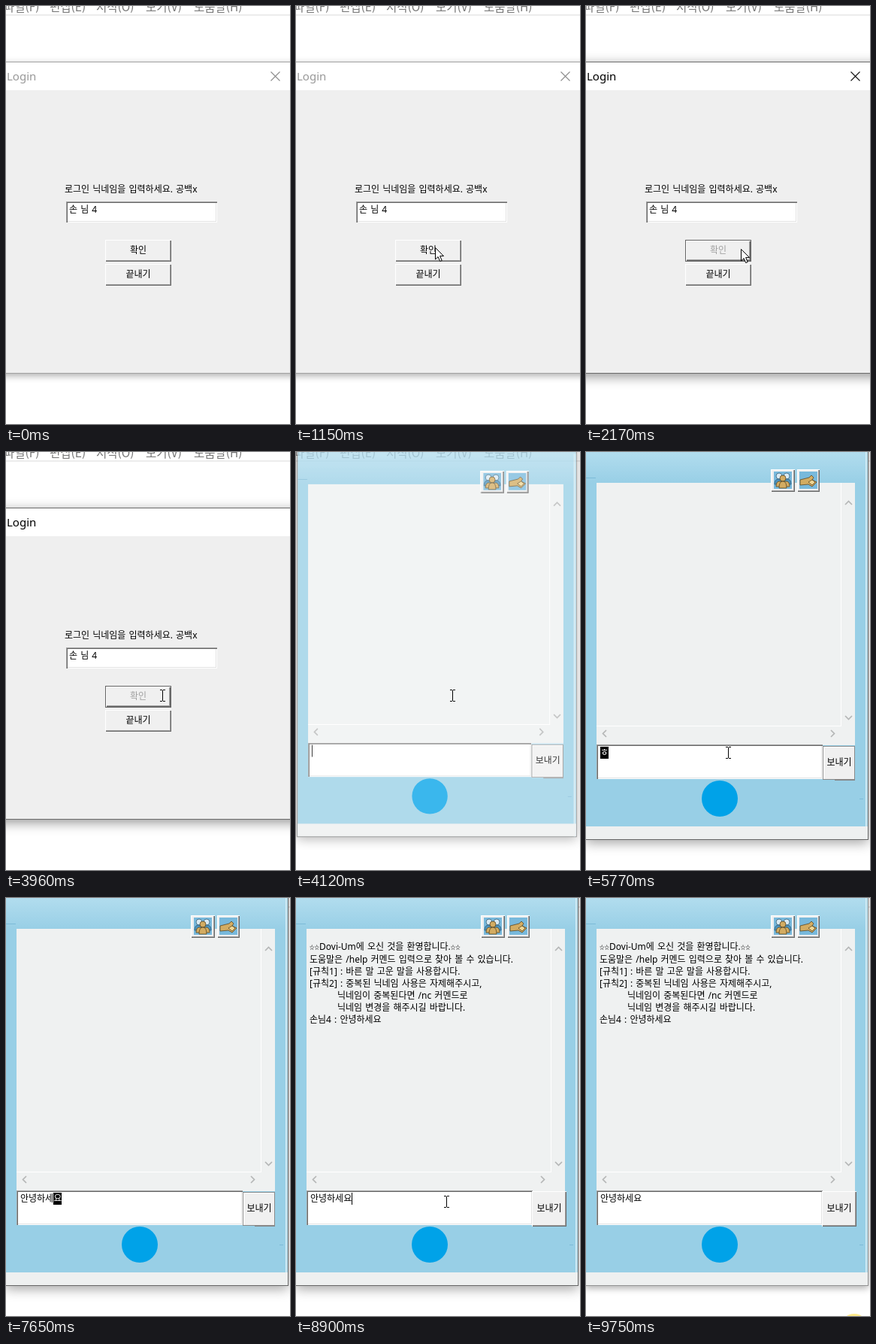
Animation of 378x556 px, one loop 9840 ms. Source, as an HTML page:

```html
<!DOCTYPE html>
<html lang="ko">
<head>
<meta charset="utf-8">
<title>Chat login</title>
<style>
html, body { margin: 0; width: 100%; height: 100%; overflow: hidden; background: #fff; }
#stage { position: relative; width: 378px; height: 556px; overflow: hidden; background: #fff;
  font: 12px/16px "Noto Sans", "Noto Sans CJK KR", sans-serif; word-spacing: 1px; color: #000; }
#stage div, #stage svg { position: absolute; box-sizing: border-box; white-space: pre; }
.layer { left: 0; top: 0; width: 378px; height: 556px; transform-origin: 186px 200px; }
.menu { top: -10px; font: 15.5px/20px "Noto Sans CJK KR", sans-serif; color: #777; }
.rule { top: 11px; width: 378px; height: 2px; background: #ececec; }

.dialog { left: -20px; top: 74px; width: 420px; height: 415px; background: #efefef;
  border: 1px solid #a2a2a2; box-shadow: 0 3px 9px rgba(0,0,0,.32); }
.title { left: 0; top: 75px; width: 378px; height: 37px; background: #fff; }
.name { left: 1px; top: 83px; font: 15px/20px "Noto Sans", sans-serif; color: #999; }
.cross { left: 352px; top: 87px; stroke: #8c8c8c; }
.active .dialog { border-color: #6c6c6c; box-shadow: 0 4px 15px rgba(0,0,0,.42); }
.active .name { color: #000; }
.active .cross { stroke: #111; }

.field { background: #fff; box-shadow: inset 1px 1px #a0a0a0, inset 2px 2px #696969,
  inset -1px -1px #fff, inset -2px -2px #e3e3e3; }
.button { background: #f0f0f0; text-align: center; box-shadow: inset 1px 1px #fff,
  inset -1px -1px #696969, inset -2px -2px #a0a0a0; }
.button.on { box-shadow: inset 0 0 0 1px #646464, inset 2px 2px #fff,
  inset -2px -2px #696969, inset -3px -3px #a0a0a0; }
.wide { left: 132px; width: 88px; height: 29px; line-height: 28px; }
.active .on { color: #a0a0a0; }

.frame { left: -1px; top: -60px; width: 377px; height: 576px; border: 1px solid #666;
  background: linear-gradient(#b4deef 55px, #98cfe6 100px);
  box-shadow: 0 4px 15px rgba(0,0,0,.36); }
.idle .frame { border-color: #929292; box-shadow: 0 3px 9px rgba(0,0,0,.32); }
.edge { left: 372px; top: 0; width: 3px; height: 515px; background: #b9dfed; border-left: 1px solid #d8edf5; }
.status { left: 0; top: 498px; width: 375px; height: 17px; background: #eef0f0; }
.log { left: 14px; top: 41px; width: 344px; height: 349px; background: #eff1f1; }
.view { left: 14px; top: 41px; width: 326px; height: 324px; border: solid #fff; border-width: 0 1px 1px 0; }
.input { left: 14px; top: 389px; width: 301px; height: 46px; }
.lip { left: 331px; top: 435px; width: 27px; height: 2px; background: #858585; }
.send { left: 314px; top: 390px; width: 46px; height: 47px; line-height: 45px; }
.send:not(.on) { left: 315px; top: 391px; width: 43px; height: 45px; line-height: 43px; padding-left: 1px;
  box-shadow: inset 0 0 0 1px #8a8a8a, inset 2px 2px #fff; }
.send.on { box-shadow: inset 1px 1px #fff, inset -1px -1px #696969, inset -2px -2px #a0a0a0; }
.tick { height: 1px; background: #7dbbd8; }
.mark { left: 154px; top: 437px; width: 48px; height: 48px; border-radius: 50%; background: #00a2e8; }
.lines { left: 18px; top: 57px; }
.lines small { font-size: 6.5px; font-weight: 700; vertical-align: 1px; }
.lines i { display: inline-block; width: 37px; }
.typed { left: 19px; top: 392px; }
.typed b { display: inline-block; font-weight: 400; height: 16px; vertical-align: top; }
.typed b.block { background: #000; color: #fff; }
.caret { top: 392px; width: 1px; height: 16px; background: #000; }
.halo { left: 339px; top: 553px; width: 36px; height: 36px; border-radius: 50%; background: #ffeb8c; }
</style>
</head>
<body>
<div id="stage">
  <div class="menu" style="left:-3px">파일(F)</div>
  <div class="menu" style="left:58px">편집(E)</div>
  <div class="menu" style="left:120px">서식(O)</div>
  <div class="menu" style="left:186px">보기(V)</div>
  <div class="menu" style="left:250px">도움말(H)</div>
  <div class="rule"></div>

  <div class="layer" id="login">
    <div class="dialog"></div>
    <div class="title"></div>
    <div class="name">Login</div>
    <svg class="cross" id="cross" width="13" height="13"><path d="M.5 .5l12 12M12.5 .5l-12 12" stroke-width="1.1"/></svg>
    <div style="left:78px;top:236px">로그인 닉네임을 입력하세요. 공백x</div>
    <div class="field" style="left:80px;top:260px;width:201px;height:28px"></div>
    <div style="left:84px;top:263px">손 님 4</div>
    <div class="button wide" id="ok" style="top:311px">확인</div>
    <div class="button wide" style="top:343px">끝내기</div>
  </div>

  <div class="layer" id="chat">
    <div class="frame"></div>
    <div class="edge"></div>
    <div class="status"></div>
    <div class="log"></div>
    <div class="view"></div>
    <div class="tick" style="left:0;top:34px;width:13px"></div>
    <div class="tick" style="left:364px;top:461px;width:5px"></div>
    <div class="button" style="left:246px;top:23px;width:32px;height:30px"></div>
    <div class="button" style="left:281px;top:23px;width:30px;height:30px"></div>
    <svg style="left:250px;top:26px" width="58" height="24">
      <path d="M0 0h24v23H0zM34 0h24v23H34z" fill="#78b9dc"/>
      <g fill="#d9eaf4" stroke="#35617c" stroke-width=".8">
        <circle cx="7" cy="6" r="4"/><circle cx="17" cy="6" r="4"/>
        <path d="M1 17q0-7 5-7t5 7zM13 17q0-7 5-7t5 7z" fill="#4d93bd"/>
      </g>
      <g fill="#d3ac62" stroke="#5d471f" stroke-width=".8">
        <path d="M3 20q0-7 4.500-7t4.500 7zM12 20q0-7 4.500-7t4.500 7z"/>
        <circle cx="12" cy="9" r="4"/>
        <path d="M7 22q0-9 5-9t5 9z"/>
        <path d="M35 11l12-3 3-3 3 3-2 3 6 3-6 6-5-3-11 1z"/>
        <path d="M46 14l5-3 4 3-4 4z" fill="#f0d795"/>
      </g>
    </svg>
    <svg style="left:0;top:0" width="378" height="556" fill="none" stroke="#b5b7b7" stroke-width="1.7">
      <path d="M345 70l4.500-4.500 4.500 4.500M345 351l4.500 4.500 4.500-4.500M27 370l-4.500 4.500 4.500 4.500M326 370l4.500 4.500-4.500 4.500"/>
    </svg>
    <div class="lines" id="lines"><small>☆☆</small>Dovi-Um에 오신 것을 환영합니다.<small>☆☆</small>
도움말은 /help 커멘드 입력으로 찾아 볼 수 있습니다.
[규칙1] : 바른 말 고운 말을 사용합시다.
[규칙2] : 중복된 닉네임 사용은 자제해주시고,
<i></i>닉네임이 중복된다면 /nc 커멘드로
<i></i>닉네임 변경을 해주시길 바랍니다.
손님4 : 안녕하세요</div>
    <div class="field input"></div>
    <div class="lip"></div>
    <div class="button send" id="send">보내기</div>
    <div class="mark"></div>
    <div class="typed"><span id="done"></span><b id="compose"></b></div>
    <div class="caret" id="caret"></div>
  </div>

  <div class="halo" id="halo"></div>
  <svg id="arrow" style="left:0;top:0" width="13" height="20">
    <path d="M.5 .5v15.500l3.600-3.400 2.600 6 2.500-1.100-2.600-5.900h4.900z" fill="#fff" stroke="#000"/>
  </svg>
  <svg id="beam" style="left:-3px;top:-8px" width="7" height="16">
    <path d="M0 .5h3M4 .5h3M3.500 1v14M0 15.500h3M4 15.500h3" fill="none" stroke="#000"/>
  </svg>
</div>
<script>
const LOOP = 9840;
const $ = id => document.getElementById(id);
const show = (id, on) => { $(id).style.visibility = on ? "inherit" : "hidden"; };
const within = (t, a, b) => t >= a && t < b;
const pick = (track, t) => track.findLast(step => step[0] <= t);

// Pointer stops: time, shape, x, y
const pointer = [
  [0, ""],
  [280, "arrow", 353, 519], [360, "arrow", 319, 470], [440, "arrow", 270, 408],
  [520, "arrow", 226, 354], [600, "arrow", 196, 322], [680, "arrow", 186, 313],
  [930, "arrow", 184, 318], [1000, "arrow", 180, 324], [1080, "arrow", 179, 326],
  [1150, "arrow", 185, 321], [2100, "arrow", 196, 322], [2170, "arrow", 206, 323],
  [3960, "beam", 208, 324], [4750, "beam", 202, 348], [4820, "beam", 193, 385],
  [4900, "beam", 189, 399], [5070, "beam", 198, 405], [5150, "beam", 193, 391],
  [5220, "beam", 189, 399], [5370, "beam", 189, 400], [6930, ""],
  [8900, "beam", 200, 404], [8980, "beam", 218, 418], [9060, "arrow", 238, 440],
  [9140, "arrow", 262, 462], [9210, "arrow", 287, 486], [9290, "arrow", 312, 508],
  [9370, "arrow", 333, 528], [9440, "arrow", 347, 543], [9520, ""]
];

// Keystrokes: time, committed text, syllable being composed
const typing = [
  [0, "", ""], [5770, "", "ㅎ"], [6470, "", ""], [6550, "", "ㅇ"], [6620, "", "아"],
  [6700, "", "안"], [6850, "안", "ㄴ"], [6930, "안", "녀"], [7020, "안", "녕"],
  [7170, "안녕", "ㅎ"], [7250, "안녕", "하"], [7330, "안녕", "핫"], [7400, "안녕하", "세"],
  [7480, "안녕하", "셍"], [7650, "안녕하세", "요"], [7820, "안녕하세요", ""]
];

// Window fades: time, opacity, scale
const loginFade = [[0, 1, 1], [4050, .35, .96], [4120, 0, .95]];
const chatFade = [[0, 0, .95], [4120, .77, .988], [4200, .96, .997], [4270, 1, 1]];

function fade(id, track, t) {
  const [, opacity, scale] = pick(track, t);
  const el = $(id);
  el.style.opacity = opacity;
  el.style.transform = scale === 1 ? "none" : `scale(${scale})`;
  show(id, opacity > 0);
}

function render(t) {
  fade("login", loginFade, t);
  fade("chat", chatFade, t);
  $("login").classList.toggle("active", t >= 1300);
  $("ok").classList.toggle("on", t >= 1400);
  show("cross", t < 3960);
  $("chat").classList.toggle("idle", t >= 9750);
  $("send").classList.toggle("on", t >= 7820);
  show("lines", t >= 7890);
  show("halo", t >= 9600);

  const [, done, part] = pick(typing, t);
  $("done").textContent = done;
  $("compose").textContent = part;
  $("compose").classList.toggle("block", !within(t, 6320, 6470));
  $("caret").style.left = t < 7820 ? "19px" : "74px";
  show("caret", within(t, 4120, 4520) || within(t, 5070, 5770) || within(t, 6470, 6550) ||
    within(t, 7820, 8350) || within(t, 8900, 9440));

  const [, shape, x, y] = pick(pointer, t);
  for (const id of ["arrow", "beam"]) {
    show(id, id === shape);
    if (id === shape) $(id).style.transform = `translate(${x}px, ${y}px)`;
  }
}

const start = performance.now();
function tick() {
  render((performance.now() - start) % LOOP);
  requestAnimationFrame(tick);
}
tick();
</script>
</body>
</html>
```
